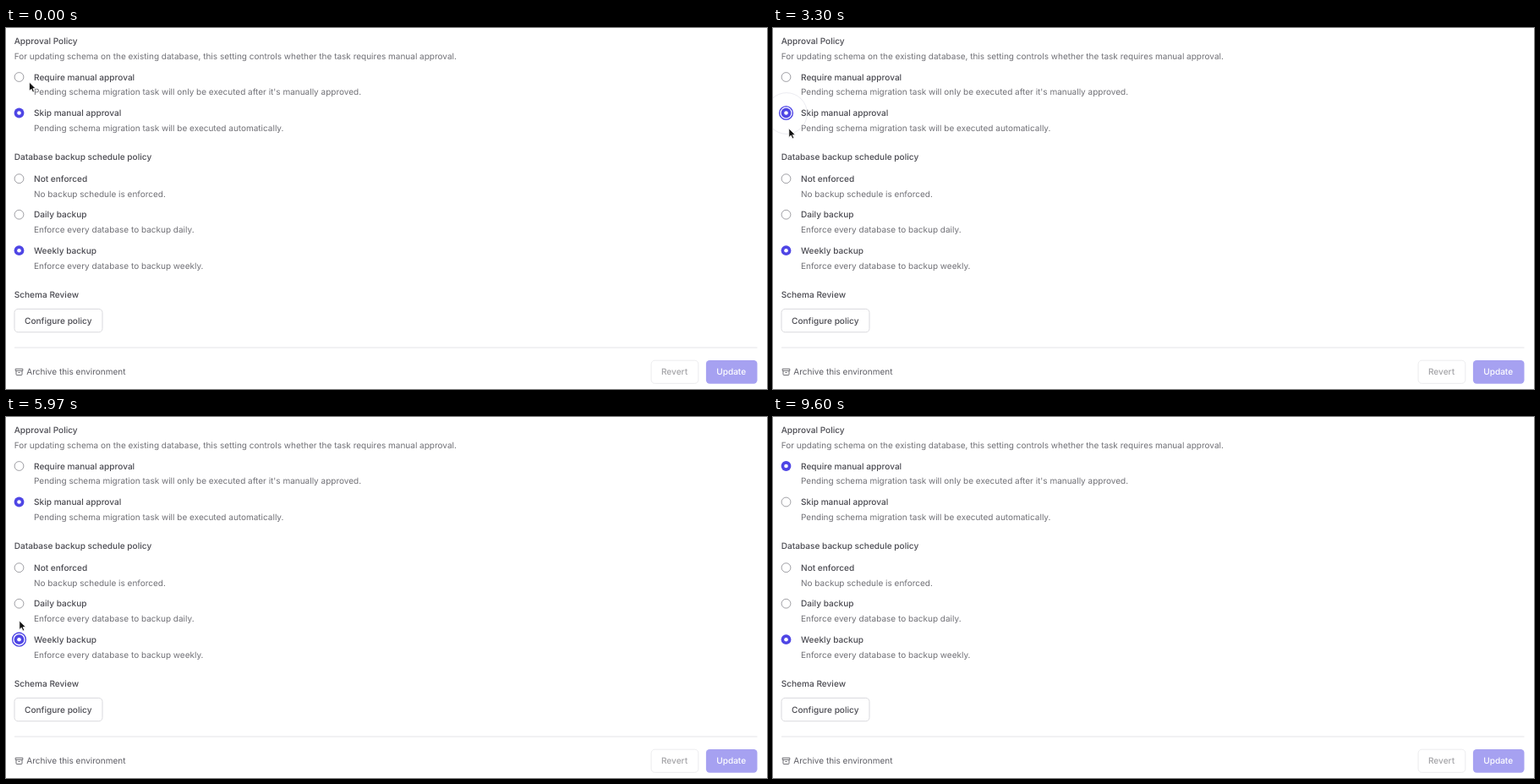
These frames come from a looping animation (900 by 427 pixels, 9.63 s). An HTML page:

```html
<!DOCTYPE html>
<html lang="en">
<head>
<meta charset="utf-8">
<title>Environment policy</title>
<style>
  html, body { margin: 0; width: 100%; height: 100%; overflow: hidden; background: #fff; }
  svg { display: block; width: 900px; height: 427px; }
  text { font: 400 10px Inter, "Liberation Sans", sans-serif; fill: #707076; text-rendering: geometricPrecision; }
  .strong { font-size: 10.1px; font-weight: 500; fill: #4a4a51; }
  .note { font-size: 8.74px; fill: #d6454b; }
  .archive { fill: #5d5d64; }
  .button { fill: #fff; stroke: #d5d5da; stroke-width: 0.9px; }
  .primary { fill: #4f46e5; }
  .onPrimary { font-size: 10.1px; font-weight: 500; fill: #fff; }
</style>
</head>
<body>
<svg id="stage" viewBox="0 0 900 427"></svg>
<script>
const LOOP = 9630;
const stage = document.getElementById('stage');

function add(tag, attrs, parent = stage) {
  const node = document.createElementNS('http://www.w3.org/2000/svg', tag);
  for (const key in attrs) node.setAttribute(key, attrs[key]);
  parent.appendChild(node);
  return node;
}

function label(x, y, content, style = '', parent = stage) {
  const node = add('text', { x, y, class: style }, parent);
  node.textContent = content;
  return node;
}

function show(node, visible) {
  node.setAttribute('visibility', visible ? 'visible' : 'hidden');
}

function makeRadio(y, title, detail) {
  const x = 15.5;
  const empty = add('circle', { cx: x, cy: y, r: 5.4, fill: '#fff', stroke: '#929298', 'stroke-width': 0.9 });
  const ring = add('circle', { cx: x, cy: y, r: 7.9, fill: '#fff', stroke: '#4f46e5', 'stroke-width': 1.4 });
  const disc = add('circle', { cx: x, cy: y, r: 5.9, fill: '#4f46e5' });
  const dot = add('circle', { cx: x, cy: y, r: 2.3, fill: '#fff' });
  label(33, y + 3.6, title, 'strong');
  label(33, y + 21.3, detail);
  return (checked, focused) => {
    show(empty, !checked);
    show(disc, checked);
    show(dot, checked);
    show(ring, checked && focused);
  };
}

function makeButton(x, y, width, height, style, parent) {
  add('rect', { x, y, width, height, rx: 4.2, class: style }, parent);
}

label(9.7, 18.6, 'Approval Policy', 'strong');
label(9.7, 36.8, 'For updating schema on the existing database, this setting controls whether the task requires manual approval.');
const approvalNote = label(90.7, 18.5, 'The policy is not applied retroactively.', 'note');
const radios = {
  require: makeRadio(58, 'Require manual approval', "Pending schema migration task will only be executed after it's manually approved."),
  skip: makeRadio(100.5, 'Skip manual approval', 'Pending schema migration task will be executed automatically.')
};

label(9.7, 156.4, 'Database backup schedule policy', 'strong');
const backupNote = label(178.6, 156.3, 'The policy is not applied retroactively.', 'note');
radios.none = makeRadio(178.2, 'Not enforced', 'No backup schedule is enforced.');
radios.daily = makeRadio(220.7, 'Daily backup', 'Enforce every database to backup daily.');
radios.weekly = makeRadio(263.2, 'Weekly backup', 'Enforce every database to backup weekly.');

label(9.7, 318.9, 'Schema Review', 'strong');
makeButton(10, 332.4, 104, 27.4, 'button');
label(22, 349.7, 'Configure policy', 'strong');

add('path', { d: 'M10 378H888.5', stroke: '#e4e4e8' });
add('path', {
  d: 'M11.2 403.2h8.6v2.2h-8.6zM12 405.4v4.3q0 .9.9.9h5.2q.9 0 .9-.9v-4.3M14.4 407.5h2.2',
  fill: 'none', stroke: '#5d5d64', 'stroke-width': 0.9, 'stroke-linejoin': 'round'
});
label(24.3, 410.4, 'Archive this environment', 'archive');

const revert = add('g', {});
makeButton(763.1, 393.2, 55.7, 27.2, 'button', revert);
label(774.9, 410.4, 'Revert', 'strong', revert);
const update = add('g', {});
makeButton(827.9, 392.9, 60.6, 27.8, 'primary', update);
label(840.2, 410.4, 'Update', 'onPrimary', update);

const ripple = add('circle', { fill: 'none', stroke: '#cfcfdb', 'stroke-width': 1 });
const cursor = add('path', {
  d: 'M0 0V10.6L2.5 8.3L4.2 12.1L6 11.3L4.4 7.6H7.6Z',
  fill: '#111', stroke: '#fff', 'stroke-width': 0.8, 'stroke-linejoin': 'round'
});

// Pointer stops: time, x, y
const path = [
  [0, 27.5, 64], [480, 27.5, 64], [800, 16.5, 59], [1200, 16.5, 59],
  [1530, 19.8, 64.5], [2010, 20, 66], [2280, 20, 66], [2800, 16, 101],
  [3120, 16, 101], [3300, 18.8, 118.8], [4000, 15.5, 221], [4650, 15.5, 222],
  [5160, 16.2, 246], [5450, 16, 263], [5780, 16, 263], [5970, 15.8, 241],
  [6700, 15.5, 59], [7120, 16, 60], [7650, 730, 327.5], [8050, 857, 400],
  [8600, 857, 400], [9180, 790, 4], [9300, 784, -16], [LOOP, 784, -16]
];

const clicks = [
  { at: 900, x: 16.5, y: 59, approval: 'require' },
  { at: 3020, x: 16, y: 101, approval: 'skip' },
  { at: 4150, x: 15.5, y: 221, backup: 'daily' },
  { at: 5600, x: 16, y: 263, backup: 'weekly' },
  { at: 6930, x: 15.5, y: 59, approval: 'require' },
  { at: 8350, x: 857, y: 400, save: true }
];

function pointerAt(t) {
  const next = path.findIndex(stop => stop[0] > t);
  const [t0, x0, y0] = path[next - 1];
  const [t1, x1, y1] = path[next];
  const p = (t - t0) / (t1 - t0);
  const e = p * p * (3 - 2 * p);
  return [x0 + (x1 - x0) * e, y0 + (y1 - y0) * e];
}

function stateAt(t) {
  const state = { approval: 'skip', backup: 'weekly', savedApproval: 'skip', focus: '', last: null };
  for (const click of clicks) {
    if (click.at > t) break;
    state.last = click;
    if (click.save) state.savedApproval = state.approval;
    if (click.approval) state.approval = click.approval;
    if (click.backup) state.backup = click.backup;
    state.focus = click.approval || click.backup || '';
  }
  return state;
}

function render(t) {
  const state = stateAt(t);
  for (const name in radios) {
    radios[name](name === state.approval || name === state.backup, name === state.focus);
  }
  const approvalDirty = state.approval !== state.savedApproval;
  const backupDirty = state.backup !== 'weekly';
  const opacity = approvalDirty || backupDirty ? 1 : 0.5;
  show(approvalNote, approvalDirty);
  show(backupNote, backupDirty);
  revert.setAttribute('opacity', opacity);
  update.setAttribute('opacity', opacity);

  const [x, y] = pointerAt(t);
  cursor.setAttribute('transform', `translate(${x} ${y})`);

  const age = state.last ? (t - state.last.at) / 340 : 1;
  show(ripple, age < 1);
  if (age < 1) {
    ripple.setAttribute('cx', state.last.x);
    ripple.setAttribute('cy', state.last.y);
    ripple.setAttribute('r', 4 + 21 * (1 - (1 - age) ** 2));
    ripple.setAttribute('opacity', 1 - 0.7 * age);
  }
}

const start = performance.now();
function tick() {
  render((performance.now() - start) % LOOP);
  requestAnimationFrame(tick);
}
tick();
</script>
</body>
</html>
```
